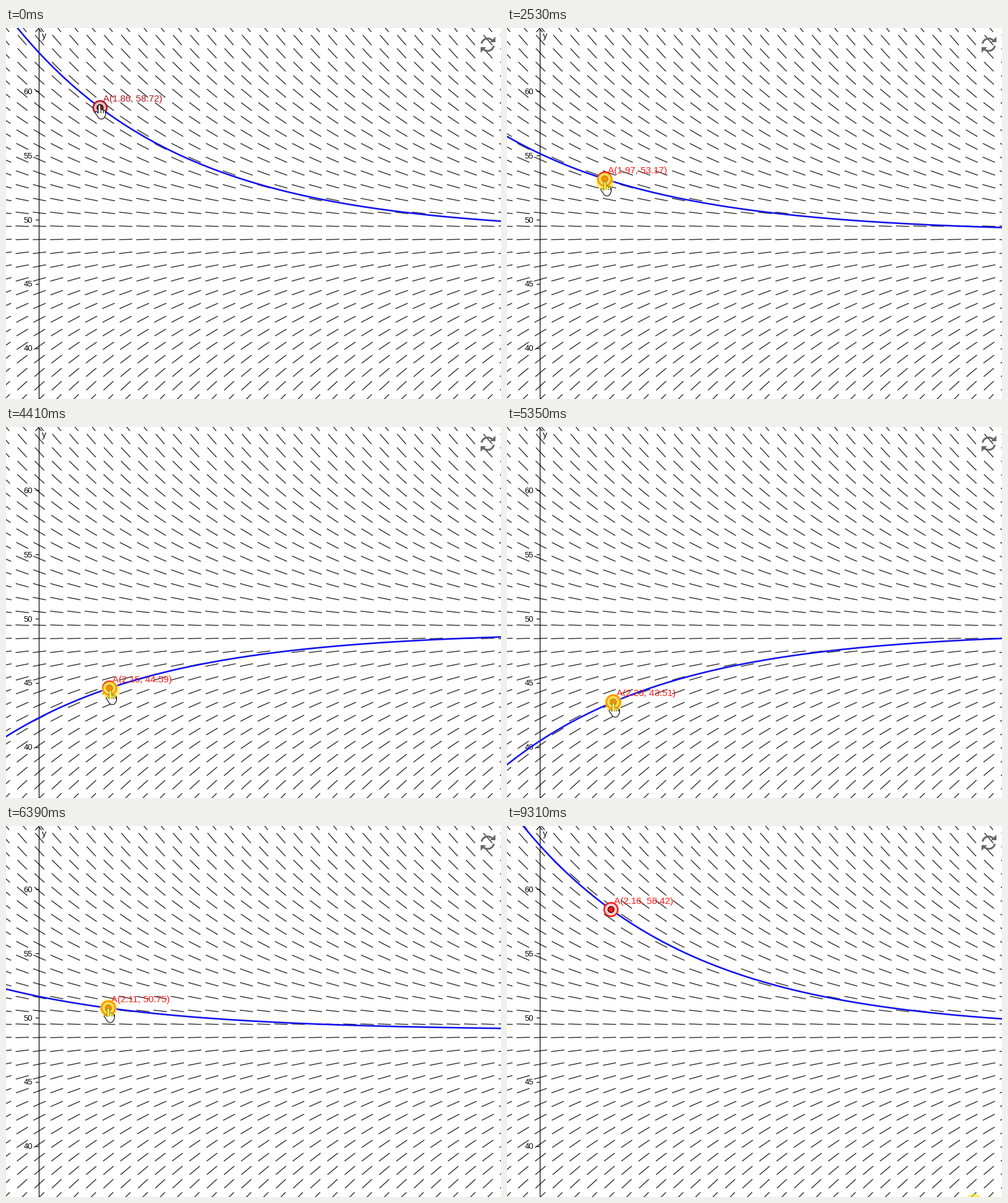
Write a matplotlib script that moves like this. It is 800 px wide and 600 px high and loops after 9.34 s.

```python
import numpy as np
import matplotlib.pyplot as plt
from matplotlib.animation import FuncAnimation
from matplotlib.patches import Arc, Circle, Polygon

W, H, DPI = 800, 600, 100
LOOP_MS, STEP_MS = 9340, 20
PX = 72 / DPI
X_ORIGIN, X_UNIT = 52.5, 53.5
Y_SIXTY, Y_UNIT = 102.3, 20.77
RATE, BALANCE = 0.198, 49.0
RED, DARK_RED, BLUE = "#ff1a14", "#b0141e", "#1212f0"
PRESS_MS, LEAVE_MS = 620, 9300

# time in ms, x, y of the dragged point
DRAG = np.array([
    (0, 1.86, 58.72), (1000, 1.86, 58.72), (2520, 1.97, 53.17),
    (3560, 2.02, 48.16), (3810, 2.06, 47.3), (3930, 2.06, 47.3),
    (4790, 2.21, 42.55), (5160, 2.21, 42.55), (5340, 2.23, 43.51),
    (6380, 2.11, 50.75), (7260, 2.07, 56.31), (7340, 2.07, 56.6),
    (7490, 2.07, 56.6), (7580, 2.09, 57.2), (7730, 2.09, 57.2),
    (7830, 2.11, 57.6), (8290, 2.11, 57.6), (8370, 2.16, 58.42),
    (9340, 2.16, 58.42)])
# time in ms, cursor offset from the point in pixels
GRIP = np.array([
    (0, -1, -5), (1000, -1, -5), (2520, 0.5, 4), (3560, 2, 5.5),
    (4790, 1, 2), (5340, 0, 1), (6380, 0, 0), (7260, -0.5, -6),
    (7580, 0, -4), (8370, 0, -3), (9340, 0, -3)])


def to_px(x, y):
    return X_ORIGIN + X_UNIT * x, Y_SIXTY + (60 - y) * Y_UNIT


def smooth(t, times, values):
    """Monotone cubic interpolation."""
    gaps = np.diff(times)
    rates = np.diff(values) / gaps
    slopes = np.zeros(len(times))
    a, b = rates[:-1], rates[1:]
    same = a * b > 0
    slopes[1:-1][same] = 2 * a[same] * b[same] / (a[same] + b[same])
    i = min(np.searchsorted(times, t, side="right") - 1, len(gaps) - 1)
    u, g = (t - times[i]) / gaps[i], gaps[i]
    return (values[i] * (1 + 2 * u) * (1 - u) ** 2 + values[i + 1] * u * u * (3 - 2 * u)
            + g * slopes[i] * u * (1 - u) ** 2 - g * slopes[i + 1] * u * u * (1 - u))


plt.rcParams["font.family"] = "Liberation Sans"
fig = plt.figure(figsize=(W / DPI, H / DPI), dpi=DPI, facecolor="white")
ax = fig.add_axes([0, 0, 1, 1])
ax.set(xlim=(0, W), ylim=(H, 0))
ax.axis("off")


def draw_field():
    cx, cy = np.meshgrid(54.1 + 27.87 * np.arange(-2, 28),
                         320.5 + 21.5 * np.arange(-15, 14))
    height = 60 - (cy - Y_SIXTY) / Y_UNIT
    angle = np.arctan(RATE * (height - BALANCE) * Y_UNIT / X_UNIT)
    dx, dy = 10.8 * np.cos(angle), 10.8 * np.sin(angle)
    gap = np.full_like(cx, np.nan)
    xs = np.stack([cx - dx, cx + dx, gap], axis=-1).ravel()
    ys = np.stack([cy - dy, cy + dy, gap], axis=-1).ravel()
    ax.plot(xs, ys, color="#202020", lw=1.3 * PX, solid_capstyle="butt", zorder=1)


def draw_axis():
    style = dict(color="black", lw=1.2 * PX, zorder=2)
    ax.plot([X_ORIGIN] * 2, [0, H], **style)
    ax.plot([48, X_ORIGIN, 57], [6, 1, 6], **style)
    for value in range(40, 61, 5):
        y = to_px(0, value)[1]
        ax.plot([48, X_ORIGIN], [y, y], **style)
        ax.text(43, y + 4.6, str(value), size=13 * PX, ha="right", va="baseline", zorder=2)
    ax.text(58, 16.5, "y", size=14 * PX, va="baseline", zorder=2)


def draw_reset_icon():
    cx, cy, grey = 778.5, 27, "#686868"
    for start in (190, 10):
        ax.add_patch(Arc((cx, cy), 20, 20, theta1=start, theta2=start + 125,
                         color=grey, lw=3 * PX, zorder=2))
    for s in (1, -1):
        head = [(cx + s * 12, cy - s * 13), (cx + s * 12, cy - s * 4), (cx + s * 3, cy - s * 4)]
        ax.add_patch(Polygon(head, color=grey, lw=0, zorder=2))


draw_field()
draw_axis()
draw_reset_icon()

HAND = np.array([
    (-2, 1.5), (0, 0), (2, 1.5), (2, 8), (4, 7.5), (5.5, 9), (7.5, 8.7), (8.5, 10),
    (10, 11), (10, 16), (8.5, 20), (6, 23), (2, 23.5), (-1, 22), (-4, 17.5),
    (-7, 13), (-6, 11), (-4, 11.5), (-2, 14)])
KNUCKLES = np.array([(2, 8), (2, 13), (np.nan, np.nan), (5.5, 9), (5.5, 13),
                     (np.nan, np.nan), (8.5, 10), (8.5, 13)])

curve_x = np.linspace(-1.1, 14.1, 200)
curve, = ax.plot([], [], color=BLUE, lw=2.6 * PX, zorder=3)
ring = ax.add_patch(Circle((0, 0), 11, lw=2.5 * PX, zorder=4))
dot = ax.add_patch(Circle((0, 0), 5, ec="black", lw=1.1 * PX, zorder=5))
label = ax.text(0, 0, "", size=15.1 * PX, va="baseline", zorder=6)
hand = ax.add_patch(Polygon(HAND, fc="white", ec="#101020", lw=1.2 * PX, zorder=7))
knuckles, = ax.plot([], [], color="#101020", lw=1 * PX, zorder=7)
halo = ax.add_patch(Circle((0, 0), 14, fc="#ffe000", alpha=0.6, lw=0, zorder=8))


def update(frame):
    t = frame * STEP_MS
    x, y = (smooth(t, DRAG[:, 0], DRAG[:, k]) for k in (1, 2))
    px, py = to_px(x, y)
    solution = BALANCE + (y - BALANCE) * np.exp(-RATE * (curve_x - x))
    curve.set_data(*to_px(curve_x, solution))

    red = RED if t >= PRESS_MS else DARK_RED
    ring.center = dot.center = px, py
    ring.set_edgecolor(red)
    ring.set_facecolor("#ffd4d4" if t >= PRESS_MS else "#dcc0c0")
    dot.set_facecolor(red)
    label.set_position((px + 5, py - 9.5))
    label.set_text(f"A({x:.2f}, {y:.2f})")
    label.set_color(red)

    tip = np.array([px, py]) + [smooth(t, GRIP[:, 0], GRIP[:, k]) for k in (1, 2)]
    if t >= LEAVE_MS:
        tip = np.array([755, 609])
    hand.set_xy(HAND + tip)
    knuckles.set_data(*(KNUCKLES + tip).T)
    halo.center = tuple(tip)
    halo.set_visible(t >= PRESS_MS)
    return curve, ring, dot, label, hand, knuckles, halo


anim = FuncAnimation(fig, update, frames=LOOP_MS // STEP_MS, interval=STEP_MS,
                     blit=True, repeat=True, repeat_delay=0)
plt.show()
```
